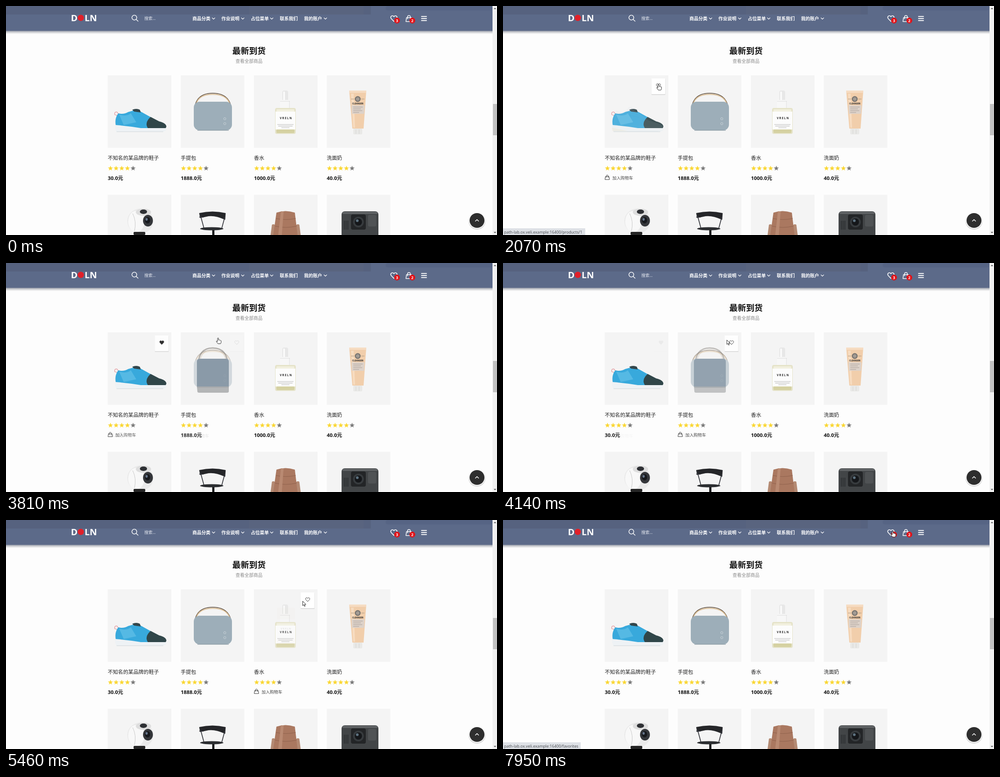
Write an HTML page that moves like this. It is 1093 px wide and 512 px high and loops after 8000 ms.

```html
<!DOCTYPE html>
<html lang="zh-CN">
<head>
<meta charset="utf-8">
<title>最新到货</title>
<style>
html, body { margin: 0; width: 100%; height: 100%; overflow: hidden; background: #fdfdfd; }
svg { display: block; width: 100vw; height: 100vh; }
text { font-family: "Noto Sans", "Noto Sans CJK SC", "Noto Sans CJK", sans-serif; fill: #222; white-space: pre; }
.line { fill: none; stroke: #fff; stroke-width: 1.5; stroke-linecap: round; stroke-linejoin: round; }
.nav { font-size: 10px; font-weight: 700; fill: #fff; }
.badge { font-size: 8.5px; font-weight: 700; fill: #fff; text-anchor: middle; }
.price { font-size: 11.4px; font-weight: 600; fill: #111; }
.mid { text-anchor: middle; }
</style>
</head>
<body>
<svg id="stage" viewBox="0 0 1093 512" preserveAspectRatio="none"></svg>
<script>
const HEART = 'M0 4.3L-3.7 .5C-5.8 -1.8 -4.2 -4.2 -2.3 -4.2C-1 -4.2 -.3 -3.4 0 -2.7C.3 -3.4 1 -4.2 2.3 -4.2C4.2 -4.2 5.8 -1.8 3.7 .5Z';
const BAG = 'M-4 -1.5H4L5 5H-5ZM-2.3 .5V-2.5Q-2.3 -5 0 -5Q2.3 -5 2.3 -2.5V.5';
const CARD_X = [226.5, 389, 552, 714];

const rect = (x, y, w, h, fill, r = 0) => `<rect x="${x}" y="${y}" width="${w}" height="${h}" fill="${fill}" rx="${r}"/>`;
const oval = (x, y, rx, ry, fill) => `<ellipse cx="${x}" cy="${y}" rx="${rx}" ry="${ry}" fill="${fill}"/>`;
const shape = (d, fill) => `<path d="${d}" fill="${fill}"/>`;
const stroke = (d, color, w = 1) => `<path d="${d}" fill="none" stroke="${color}" stroke-width="${w}"/>`;
const text = (x, y, s, attrs) => `<text x="${x}" y="${y}" ${attrs}>${s}</text>`;

const starPath = Array.from({ length: 10 }, (_, i) => {
  const r = i % 2 ? 2.6 : 6, a = (i / 5 - 0.5) * Math.PI;
  return (i ? 'L' : 'M') + (r * Math.cos(a)).toFixed(2) + ' ' + (r * Math.sin(a)).toFixed(2);
}).join('') + 'Z';

const products = [
  {
    name: '不知名的某品牌的鞋子', price: '30.0元',
    front: stroke('M252 246L242 243Q241 236 247 237L251 242', '#e49a9e', 1.3)
      + shape('M244 265Q242 250 250 240Q262 243 272 237L283 234L298 235L323 249L314 263L318 276L246 271Z', '#38a9dc')
      + shape('M252 243Q268 248 278 240L290 260L262 266Z', '#55b9e4')
      + shape('M322 248L341 258Q357 262 357 270L354 276L318 276Q306 262 322 248Z', '#304649')
      + shape('M281 232Q290 228 298 232L300 238L285 236Z', '#33464b')
      + shape('M243 266Q270 268 300 273L357 273Q358 279 350 281L246 281Q242 276 243 266Z', '#eef2f5')
      + stroke('M246 281H350', '#c4cdd2', .8),
    back: shape('M245 270Q247 244 253 234Q265 242 275 232L280 226L287 225Q291 236 301 239L324 256L348 264Q358 267 354 273L345 277L245 276Z', '#c5d8e6')
      + shape('M253 234Q265 243 276 234L292 262L253 267Z', '#aecbdf')
      + shape('M300 239L324 256L348 264L343 270L302 268Z', '#d6dce3')
      + stroke('M276 237L299 242M274 242L303 249M280 226L285 250', '#87b4cc')
      + shape('M243 270Q280 266 355 269Q355 276 346 279H245Z', '#e2e6ea')
      + shape('M242 272L262 276L278 280H244Z', '#dcb04d') + stroke('M276 280H346', '#a0a8b0')
  },
  {
    name: '手提包', price: '1888.0元',
    front: stroke('M419.5 242Q417 195 460 195Q504 195 502 242', '#5b4c3e', 1.6)
      + stroke('M422 230Q422 197.5 460 197.5Q499 197.5 500 230', '#d9bd95', 2)
      + rect(418, 214, 85, 64, '#a5b5bf', 13) + rect(418, 214, 85, 64, 'url(#weave)', 13)
      + stroke('M426 278H496', '#7d8d98', 1.2)
      + '<g fill="none" stroke="#c8d2d8"><circle cx="487" cy="252" r="2.5"/><circle cx="487" cy="263" r="2.5"/></g>',
    back: stroke('M428 232Q427 190 460 190Q494 190 494 232', '#8c8781', 3)
      + stroke('M431 230Q431 194 460 194Q491 194 491 230', '#cdbba4', 1.2)
      + rect(425, 214, 71, 68, '#5c7185', 6) + rect(425, 214, 71, 68, 'url(#weave)', 6)
      + shape('M425 276H496V287Q496 290 492 290H430Q426 290 426 287Z', '#8c8e90')
  },
  {
    name: '香水', price: '1000.0元',
    front: rect(615, 189, 13, 24, '#e7e7e7', 4) + rect(617, 191, 4, 20, '#fafafa', 2)
      + rect(610, 210, 22, 19, '#f7f7f7', 2) + stroke('M610 213H632M631 212V228', '#dcdcdc')
      + rect(599, 228, 46, 58, '#e5e3c9', 4) + rect(602, 231, 40, 5, '#f2f0df', 2)
      + rect(602, 276, 40, 8, '#d5d1a2', 2) + rect(600, 236, 44, 40, '#fcfcfc')
      + text(623.5, 253, 'VRELN', 'class="mid" font-size="6.2" font-weight="700" letter-spacing="1.6"')
      + stroke('M604 265H640M606 268.5H638M613 272H631', '#a9a9a9', .9),
    back: rect(603, 196, 40, 90, '#ebe8da', 2) + rect(603, 222, 40, 42, '#fafafa')
      + text(623.5, 245, 'VRELN', 'class="mid" font-size="5.5" font-weight="700" letter-spacing="1.2"')
  },
  {
    name: '洗面奶', price: '40.0元',
    front: shape('M764 189H802L796 274H771Z', '#f1ceab') + shape('M764 189H802L801.5 194H764.5Z', '#f6dcc2')
      + shape('M768 196L773 272H777L774 196Z', '#f7dcc0')
      + rect(773, 274, 20, 13, '#e9e9e7', 2) + stroke('M779 276V286M786 276V286', '#d4d4d2')
      + shape('M769 222H798L797 241H770Z', '#ddd2c9')
      + oval(783, 208, 6.5, 6.5, '#77736f') + oval(783, 208, 4, 4, '#a29a93')
      + stroke('M768 208H775M791 208H798', '#a9957f')
      + text(783, 220, 'CLEANSER', 'class="mid" font-size="5" font-weight="700"')
      + stroke('M773 226H794M773 230H790M773 234H793M773 238H786', '#9a9188', .8),
    back: rect(762, 218, 42, 64, '#efceb0', 5) + rect(765, 205, 36, 16, '#e9e9e7', 3)
      + text(783, 250, 'CLEANSER', 'class="mid" font-size="5" font-weight="700"')
  }
];

const lowerRow = oval(299, 481, 29, 28, '#eaeaea') + oval(290, 482, 18, 24, '#f8f8f8')
  + oval(306, 461, 17, 8, '#dedede') + oval(306, 460, 8, 5, '#2e3034')
  + oval(316, 480, 11, 13, '#34363a') + oval(315, 479, 6, 7, '#17191d') + oval(313, 477, 2.5, 3, '#66758a')
  + stroke('M282 464Q291 482 286 503', '#c8c8c8') + rect(284, 505, 26, 7, '#252525', 2)
  + shape('M430 463Q460 456 489 463L488 478Q466 468 451 470L432 474Z', '#252629')
  + stroke('M432 465L441 498M487 472L480 498M440 472H430', '#303238', 1.7)
  + oval(458, 498, 26, 3.5, '#2c2e31') + rect(459, 501, 5, 11, '#1e1f21')
  + shape('M592 489Q602 483 606 512H589ZM653 489Q643 483 638 512H656Z', '#b48a73')
  + shape('M602 462Q622 455 643 462L649 512H595Z', '#aa7860')
  + stroke('M601 475Q622 480 645 475M599 492Q622 498 647 492', '#8f614c') + shape('M612 459L606 512H614L618 459Z', '#b98a72')
  + rect(747, 459, 82, 60, '#424547', 7) + rect(749, 460, 78, 5, '#606365', 3)
  + rect(768, 466, 33, 34, '#232527', 4) + oval(784.5, 483, 12, 12, '#373b3e')
  + oval(784.5, 483, 8, 8, '#15171a') + oval(782, 480, 3, 3, '#5d7280')
  + rect(806, 467, 18, 26, '#505355', 3) + stroke('M753 480V500M757 480V500M761 480V500', '#24272a', 1.4);

function card(p, i) {
  const x = CARD_X[i];
  const stars = [0, 1, 2, 3, 4].map(k =>
    `<path d="${starPath}" transform="translate(${x + 6 + k * 12.6} 363)" fill="${k < 4 ? '#fad735' : '#7c7c7c'}"/>`).join('');
  return rect(x, 155, 141.5, 162, '#f4f4f4') + rect(x, 422, 141.5, 90, '#f4f4f4')
    + `<g id="front${i}">${p.front}</g><g id="back${i}">${p.back}</g>`
    + text(x, 344.2, p.name, 'font-size="11.4"') + stars
    + text(x, 389, p.price, `id="price${i}" class="price"`)
    + `<g id="cart${i}"><path d="${BAG}" transform="translate(${x + 5.5} 383)" fill="none" stroke="#333"/>`
    + text(x + 17, 387.5, '加入购物车', 'font-size="9.2" style="fill:#444"') + '</g>'
    + `<g id="fav${i}">` + rect(x + 104, 163, 31, 36, '#ddd', 1) + rect(x + 104, 162, 30.5, 35, '#fff', 1)
    + `<path id="heart${i}" d="${HEART}" transform="translate(${x + 119.5} 178)" fill="none" stroke="#333"/></g>`;
}

const menu = [[415, '商品分类', 462], [479.5, '作业说明', 527], [545, '占位菜单', 591.5], [609.5, '联系我们'], [663.5, '我的账户', 711]]
  .map(([x, s, c]) => text(x, 31.6, s, 'class="nav"') + (c ? `<path class="line" style="stroke-width:1.1" d="M${c - 3} 26.5l3 3 3 -3"/>` : '')).join('');

const header = rect(0, 55, 1083, 8, 'url(#shade)') + rect(0, 0, 1083, 55.5, '#5c6a89')
  + rect(0, 0, 812, 19, '#56627f') + rect(541, 0, 255, 19, '#59647f') + rect(845, 0, 238, 10, '#566484', 5)
  + text(144.5, 33.5, 'D', 'font-size="20" font-weight="800" style="fill:#fff"') + oval(166.5, 26.5, 7, 7, '#e0202a')
  + text(175, 33.5, 'LN', 'font-size="20" font-weight="800" style="fill:#fff" textLength="0"').replace(' textLength="0"', '')
  + '<circle class="line" cx="285.7" cy="26" r="5.4"/><path class="line" d="M290 30.3L294 34"/>'
  + text(308, 31.3, '搜索...', 'font-size="9" style="fill:#e8ebf2"') + menu
  + `<path class="line" d="${HEART}" transform="translate(863.5 28) scale(1.5)" style="stroke-width:1.1"/>`
  + `<path class="line" d="${BAG}" transform="translate(897 28) scale(1.35)" style="stroke-width:1.1"/>`
  + oval(870.5, 32.5, 6.5, 6.5, '#e01218') + text(870.5, 35.7, '3', 'class="badge"')
  + oval(904.5, 32.5, 6.5, 6.5, '#e01218') + text(904.5, 35.7, '2', 'class="badge"')
  + '<path class="line" style="stroke-width:2" d="M925 23.5H936M925 28H936M925 32.5H936"/>';

const chrome = rect(1083, 0, 10, 512, '#f1f1f1') + rect(1084, 219, 9, 70, '#c1c1c1')
  + shape('M1085.5 7L1088.5 4L1091.5 7Z', '#606060') + shape('M1085.5 505L1088.5 508L1091.5 505Z', '#606060')
  + oval(1048.5, 481, 19, 19, '#00000022') + oval(1048.5, 479.5, 18, 18, '#fff') + oval(1048.5, 479.5, 16.6, 16.6, '#2e2e2e')
  + '<path class="line" d="M1045 481l3.5 -3.5 3.5 3.5"/>'
  + '<g id="status"><rect id="statusBox" y="497" height="15" fill="#dee1e6"/><text id="statusText" x="2.5" y="508.5" font-size="8.7" style="fill:#4d5156"></text></g>';

const pointers = '<g id="cursor" fill="#fff" stroke="#111" stroke-width=".9" stroke-linejoin="round">'
  + '<path id="arrow" d="M0 0V10L2.4 7.8L4 11.6L5.6 10.9L4 7.3H7.2Z"/>'
  + '<path id="hand" d="M-1.2 .8Q0 -.8 1.2 .8V4.8Q2.4 4 3.4 5Q4.6 4.6 5.3 5.6Q6.8 5.4 6.8 7V9.5Q6.8 11 5.5 13H-.2L-3.8 8.3Q-4.2 6.8 -2.8 6.9L-1.2 8.2Z"/></g>';

document.getElementById('stage').innerHTML = `<defs>
<linearGradient id="shade" x2="0" y2="1"><stop stop-color="#6a7285" stop-opacity=".75"/><stop offset="1" stop-color="#aaa" stop-opacity="0"/></linearGradient>
<pattern id="weave" width="3" height="3" patternUnits="userSpaceOnUse"><path d="M0 0H1.5V1.5H0ZM1.5 1.5H3V3H1.5Z" fill="#6f8797" opacity=".3"/></pattern></defs>`
  + rect(0, 0, 1093, 512, '#fdfdfd')
  + text(541, 107, '最新到货', 'class="mid" font-size="18.6" font-weight="700" style="fill:#111"')
  + text(541, 126.7, '查看全部商品', 'class="mid" font-size="10" style="fill:#888"')
  + products.map(card).join('') + lowerRow + header + chrome + pointers;

// Pointer path: time, x, y of the hot spot
const path = [
  [200, -20, 300], [1000, 226, 255], [1250, 286, 247], [1500, 286, 247], [1905, 334, 188], [2060, 346, 175],
  [3010, 346, 175], [3400, 352, 172], [3700, 378, 170], [3810, 472, 167.5], [4050, 494, 171], [4350, 508, 174.5],
  [4710, 508, 174.5], [4780, 531, 176], [4900, 552, 180], [5300, 656, 182], [5460, 660.5, 181.5], [5550, 660.5, 181.5],
  [5650, 670, 174.5], [5980, 670, 174.5], [6150, 694, 175], [6300, 714, 175], [6550, 818, 174], [6700, 832, 174.5],
  [6820, 832, 174.5], [6950, 845, 154], [7400, 867.5, 25], [8000, 867.5, 25]
];
const cardHover = [[1000, 3700], [3700, 4780], [4900, 6150], [6300, 6950]];
const imageHover = [[1000, 1905], [3700, 4050], [4900, 5300], [6300, 6550]];
const HOST = 'path-lab.ox.veli.example:16400/';

const $ = id => document.getElementById(id);
const clamp = v => Math.max(0, Math.min(1, v));
const ease = v => v * v * (3 - 2 * v);
const fade = (t, [on, off], d) => ease(clamp((t - on) / d)) - ease(clamp((t - off) / d));
const linearFade = (t, [on, off], d) => clamp((t - on) / d) - clamp((t - off) / d);

function pointerAt(t) {
  const n = path.findIndex(p => p[0] > t);
  if (n < 1) return path[0].slice(1);
  const [t0, x0, y0] = path[n - 1], [t1, x1, y1] = path[n], k = (t - t0) / (t1 - t0);
  return [x0 + (x1 - x0) * k, y0 + (y1 - y0) * k];
}

function overLink(x, y) {
  if (x > 856 && x < 877 && y > 19 && y < 39) return true;
  return CARD_X.some(c => {
    const dx = x - c;
    if (dx < 0 || dx > 141.5 || y < 155 || y > 317) return false;
    const inBox = dx > 104 && dx < 134.5 && y > 162 && y < 197;
    return !inBox || Math.hypot(dx - 119.5, y - 177) < 6;
  });
}

function draw(t) {
  CARD_X.forEach((_, i) => {
    const p = fade(t, cardHover[i], 500), flip = linearFade(t, imageHover[i], 180);
    $('front' + i).setAttribute('opacity', 1 - flip);
    $('back' + i).setAttribute('opacity', flip);
    $('price' + i).setAttribute('opacity', 1 - p);
    $('cart' + i).setAttribute('opacity', p);
    $('cart' + i).setAttribute('transform', `translate(0 ${3 * (1 - p)})`);
    $('fav' + i).setAttribute('opacity', p);
    $('fav' + i).setAttribute('transform', `translate(${6 * (1 - p)} 0)`);
  });
  $('heart0').setAttribute('fill', t >= 2590 ? '#111' : 'none');

  const favorites = t > 5000;
  $('status').setAttribute('opacity', favorites ? clamp((t - 7560) / 100) : linearFade(t, [1500, 2250], 100));
  $('statusBox').setAttribute('width', favorites ? 173 : 183);
  $('statusText').textContent = HOST + (favorites ? 'favorites' : 'products/1');

  const [x, y] = pointerAt(t), link = overLink(x, y);
  $('cursor').setAttribute('transform', `translate(${x} ${y})`);
  $('hand').setAttribute('display', link ? 'inline' : 'none');
  $('arrow').setAttribute('display', link ? 'none' : 'inline');
}

function tick() {
  draw(performance.now() % 8000);
  requestAnimationFrame(tick);
}
tick();
</script>
</body>
</html>
```
